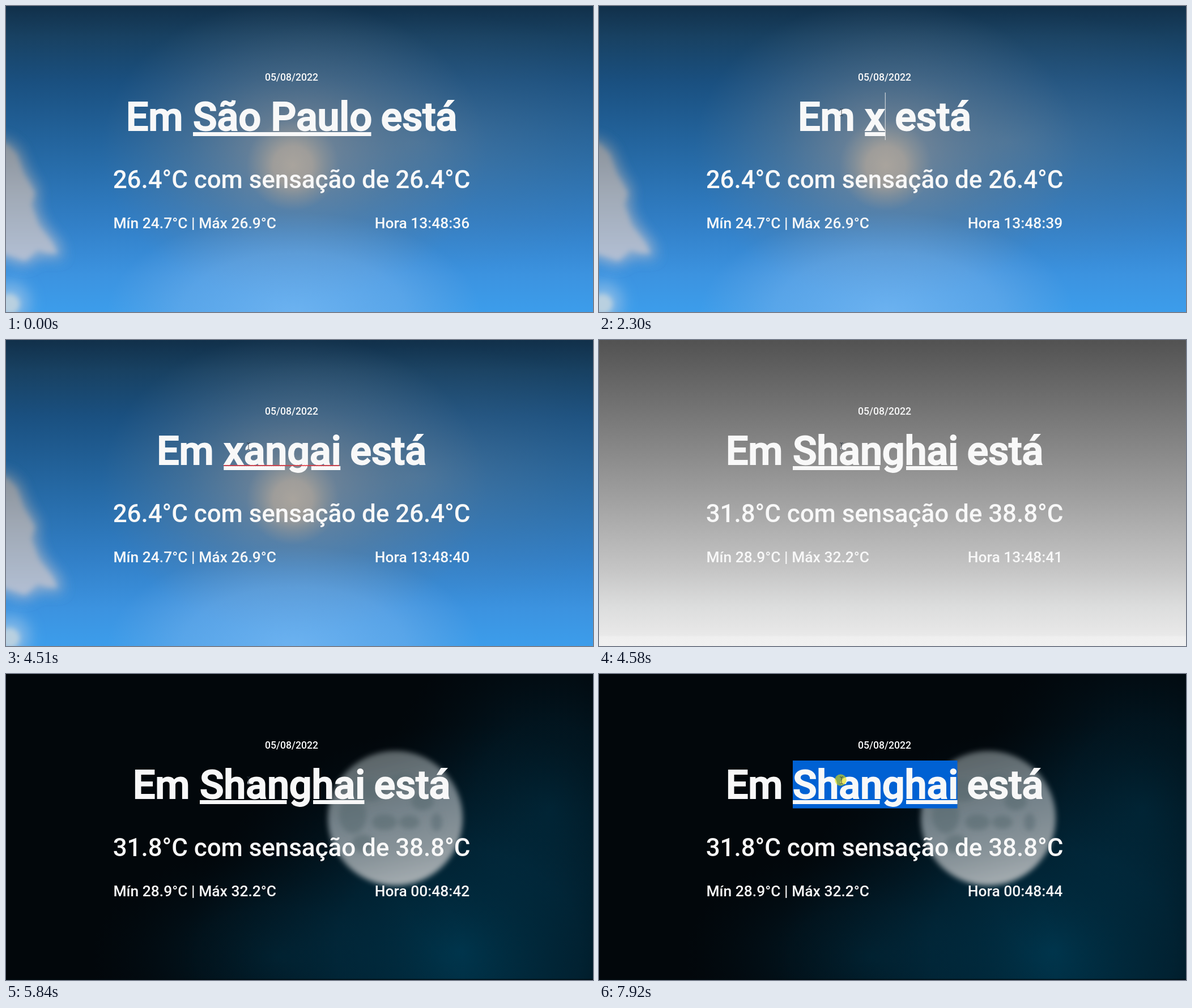
An HTML page that plays this animation: 1036x541 px, repeating every 7.99 s.

```html
<!DOCTYPE html>
<html lang="pt">
<head>
<meta charset="utf-8">
<title>Tempo</title>
<style>
  html, body { margin: 0; width: 100%; height: 100%; overflow: hidden; background: #11304a; }
  svg { display: block; width: 100vw; height: 100vh; }
  text { font-family: Roboto, "Open Sans", sans-serif; font-weight: 500; fill: #f8f8f8; white-space: pre; }
  #title text { font-size: 70.4px; letter-spacing: -.25px; stroke: #f8f8f8; stroke-width: 2px; }
  #feel { font-size: 44px; letter-spacing: -.1px; text-anchor: middle; }
  #date { font-size: 17.6px; text-anchor: middle; }
  .small { font-size: 26.4px; }
  #clock { text-anchor: end; }
</style>
</head>
<body>
<svg viewBox="0 0 1036 541" preserveAspectRatio="none">
  <defs>
    <linearGradient id="sky" x2="0" y2="1">
      <stop offset="0" stop-color="#11304a"/>
      <stop offset=".1" stop-color="#184162"/>
      <stop offset=".25" stop-color="#1a5080"/>
      <stop offset=".5" stop-color="#266aa6"/>
      <stop offset=".72" stop-color="#3280c8"/>
      <stop offset=".88" stop-color="#3c93e0"/>
      <stop offset="1" stop-color="#3c9deb"/>
    </linearGradient>
    <radialGradient id="haze">
      <stop offset="0" stop-color="#a09c98" stop-opacity=".72"/>
      <stop offset=".25" stop-color="#8c8e92" stop-opacity=".55"/>
      <stop offset=".55" stop-color="#74828f" stop-opacity=".34"/>
      <stop offset="1" stop-color="#6a7d90" stop-opacity="0"/>
    </radialGradient>
    <radialGradient id="sun">
      <stop offset="0" stop-color="#a9a49d"/>
      <stop offset=".42" stop-color="#a39f9a" stop-opacity=".9"/>
      <stop offset=".7" stop-color="#989997" stop-opacity=".45"/>
      <stop offset="1" stop-color="#909498" stop-opacity="0"/>
    </radialGradient>
    <radialGradient id="low">
      <stop offset="0" stop-color="#78b8f2" stop-opacity=".8"/>
      <stop offset=".6" stop-color="#74b0ea" stop-opacity=".5"/>
      <stop offset="1" stop-color="#70a8e0" stop-opacity="0"/>
    </radialGradient>
    <linearGradient id="cloud" x2="0" y2="1">
      <stop offset="0" stop-color="#8b939c"/>
      <stop offset=".4" stop-color="#9fa8b4"/>
      <stop offset="1" stop-color="#b2bfd4"/>
    </linearGradient>
    <linearGradient id="grey" x2="0" y2="1">
      <stop offset="0" stop-color="#525252"/>
      <stop offset=".5" stop-color="#9d9d9d"/>
      <stop offset=".75" stop-color="#c5c5c5"/>
      <stop offset=".87" stop-color="#dcdddd"/>
      <stop offset=".93" stop-color="#e4e4e4"/>
      <stop offset=".965" stop-color="#e9e9e9"/>
      <stop offset=".97" stop-color="#efefef"/>
      <stop offset="1" stop-color="#f0f0f0"/>
    </linearGradient>
    <radialGradient id="teal">
      <stop offset="0" stop-color="#00374f"/>
      <stop offset=".45" stop-color="#012b3f" stop-opacity=".75"/>
      <stop offset="1" stop-color="#011520" stop-opacity="0"/>
    </radialGradient>
    <linearGradient id="moon" x1=".35" y1="0" x2=".6" y2="1">
      <stop offset="0" stop-color="#596265"/>
      <stop offset=".45" stop-color="#74828a"/>
      <stop offset=".75" stop-color="#89949a"/>
      <stop offset="1" stop-color="#a6aeb2"/>
    </linearGradient>
    <filter id="soft" filterUnits="userSpaceOnUse" x="-60" y="-60" width="1156" height="661"><feGaussianBlur stdDeviation="5"/></filter>
    <filter id="wide" filterUnits="userSpaceOnUse" x="-60" y="-60" width="1156" height="661"><feGaussianBlur stdDeviation="13"/></filter>
  </defs>

  <g id="day">
    <rect width="1036" height="541" fill="url(#sky)"/>
    <ellipse cx="720" cy="240" rx="480" ry="230" fill="url(#haze)" opacity=".35"/>
    <ellipse cx="508" cy="255" rx="340" ry="265" fill="url(#haze)"/>
    <ellipse cx="508" cy="545" rx="330" ry="180" fill="url(#low)"/>
    <ellipse cx="506" cy="282" rx="82" ry="80" fill="url(#sun)"/>
    <g fill="url(#cloud)">
      <path id="puff" d="M-30 236 L2 238 L22 256 L34 290 L56 328 L50 352 L64 386 L90 418 L100 444 L74 442 L58 438 L36 457 L12 450 L-30 434Z" filter="url(#wide)" opacity=".55"/>
      <use href="#puff"/>
      <path d="M-30 244 L0 244 L18 262 L30 296 L50 330 L44 352 L57 388 L82 420 L91 438 L72 436 L56 431 L34 450 L14 443 L-30 428Z" filter="url(#soft)"/>
    </g>
    <ellipse cx="8" cy="524" rx="34" ry="36" fill="#7fb6e6" filter="url(#wide)"/>
    <ellipse cx="6" cy="527" rx="18" ry="18" fill="#b9d0e0" filter="url(#soft)"/>
  </g>

  <rect id="wait" width="1036" height="541" fill="url(#grey)"/>

  <g id="night">
    <rect width="1036" height="541" fill="#02070b"/>
    <ellipse cx="800" cy="490" rx="480" ry="400" fill="url(#teal)"/>
    <ellipse cx="960" cy="240" rx="300" ry="340" fill="url(#teal)" opacity=".5"/>
    <ellipse cx="480" cy="500" rx="330" ry="200" fill="url(#teal)" opacity=".4"/>
    <circle cx="687" cy="255" r="119" fill="url(#moon)" filter="url(#soft)"/>
    <g id="seas" fill="#52666d" filter="url(#soft)"></g>
    <rect y="539" width="1036" height="2" fill="#010a10" opacity=".7"/>
  </g>

  <rect id="pick" y="153" height="84.5"/>
  <text id="date" x="504" y="132">05/08/2022</text>
  <g id="title">
    <text id="pre" y="220">Em</text>
    <text id="city" y="220"></text>
    <text id="post" y="220">está</text>
  </g>
  <path id="line" fill="#f8f8f8"/>
  <path id="wave" fill="none" stroke="#e0343c" stroke-width="1.5"/>
  <rect id="caret" y="153" width="1" height="84" fill="#e8e8e8"/>
  <text id="feel" x="504" y="322"></text>
  <text id="range" class="small" x="189.5" y="393"></text>
  <text id="clock" class="small" x="818.3" y="393"></text>

  <circle id="click" cx="426.5" cy="187.5" r="10.3" fill="#eadf00"/>
  <path id="arrow" d="M0 0V16L4 12.5L6.5 18.5L9 17.4L6.5 11.6H11.5Z" fill="#fff" stroke="#111" stroke-width="1"/>
  <path id="beam" d="M-3 -6H-1L0 -5L1 -6H3M0 -5V5M-3 6H-1L0 5L1 6H3" fill="none" stroke="#2b3440" stroke-width="1" opacity=".85"/>
</svg>

<script>
const LOOP = 7990;
const $ = id => document.getElementById(id);

// name: [width of the word, start of the gap the "g" leaves in the underline]
const words = {
  "São Paulo": [314.5, 999], "x": [36, 999], "xa": [73, 999], "xan": [112, 999],
  "xang": [151.5, 108.5], "xanga": [188.5, 108.5], "xangai": [206, 108], "Shanghai": [290.5, 153.5]
};
const GAP = 46.5;

const cityAt = [[0, "São Paulo"], [2170, "x"], [2850, "xa"], [2920, "xan"], [3180, "xang"],
  [3320, "xanga"], [3520, "xangai"], [4580, "Shanghai"]];
const clockAt = [[0, "13:48:36"], [830, "13:48:37"], [1240, "13:48:38"], [2170, "13:48:39"],
  [3320, "13:48:40"], [4580, "13:48:41"], [5570, "00:48:42"], [6570, "00:48:43"], [7490, "00:48:44"]];
const sceneAt = [[0, "day"], [4580, "wait"], [5840, "night"]];
const pickAt = [[0, 0], [1040, 1], [2170, 0], [7630, 1]];
const clickAt = [[0, 0], [830, .6], [900, 0], [980, .6], [1170, .3], [1240, 0],
  [7490, .6], [7560, 0], [7630, .6], [7850, .7], [7920, .6]];
const caretAt = [[0, 0], [2170, 1], [3850, 0]];
const path = [[851, 466], [762, 392], [622, 292], [500, 225], [440, 201], [409, 190], [428, 188]];

const at = (steps, t) => steps.filter(s => s[0] <= t).pop()[1];
const set = (id, attrs) => { for (const k in attrs) $(id).setAttribute(k, attrs[k]); };
const show = (id, on) => { $(id).style.display = on ? "" : "none"; };
const say = (id, s) => { if ($(id).textContent !== s) $(id).textContent = s; };

// Dark patches on the moon: x, y, rx, ry
[[612, 250, 24, 32], [640, 205, 30, 20], [700, 190, 26, 14], [735, 225, 20, 16],
 [668, 262, 22, 14], [630, 300, 20, 16], [712, 262, 18, 12], [760, 262, 10, 16]].forEach(([cx, cy, rx, ry]) => {
  const e = document.createElementNS("http://www.w3.org/2000/svg", "ellipse");
  for (const [k, v] of Object.entries({ cx, cy, rx, ry, opacity: .5 })) e.setAttribute(k, v);
  $("seas").append(e);
});

function bar(x, w) {
  return w > 0 ? `M${x} 223h${w}v7h${-w}z` : "";
}

function drawTitle(t) {
  const city = at(cityAt, t), [w, gap] = words[city];
  const x = 487.25 - w / 2, end = x + w;
  say("city", city);
  set("pre", { x: x - 118.2 });
  set("city", { x });
  set("post", { x: end + 17 });
  set("line", { d: bar(x, Math.min(w, gap)) + bar(x + gap + GAP, w - gap - GAP) });
  set("pick", { x, width: w, fill: t < 4580 ? "#0c6fe6" : "#0061d3" });
  set("caret", { x: end - .5 });
  let d = `M${x} 222.5`;
  for (let i = 0; i < w / 2 - 1; i++) d += `l2 ${i % 2 ? 1 : -1}`;
  set("wave", { d });
  show("wave", t >= 3850 && t < 4580);
  show("caret", at(caretAt, t));
  show("pick", at(pickAt, t));
}

function drawPointer(t) {
  const k = Math.min(6, Math.floor((t - 260) / 70));
  const move = `translate(${path[Math.max(0, k)]})`;
  set("arrow", { transform: move });
  set("beam", { transform: move });
  show("arrow", k >= 0 && k < 4);
  show("beam", k >= 4);
  set("click", { opacity: at(clickAt, t) });
}

function render(t) {
  const scene = at(sceneAt, t), first = t < 4580;
  for (const id of ["day", "wait", "night"]) show(id, id === scene);
  say("feel", first ? "26.4°C com sensação de 26.4°C" : "31.8°C com sensação de 38.8°C");
  say("range", first ? "Mín 24.7°C | Máx 26.9°C" : "Mín 28.9°C | Máx 32.2°C");
  say("clock", "Hora " + at(clockAt, t));
  drawTitle(t);
  drawPointer(t);
}

const start = performance.now();
function tick() {
  render((performance.now() - start) % LOOP);
  requestAnimationFrame(tick);
}
tick();
</script>
</body>
</html>
```
